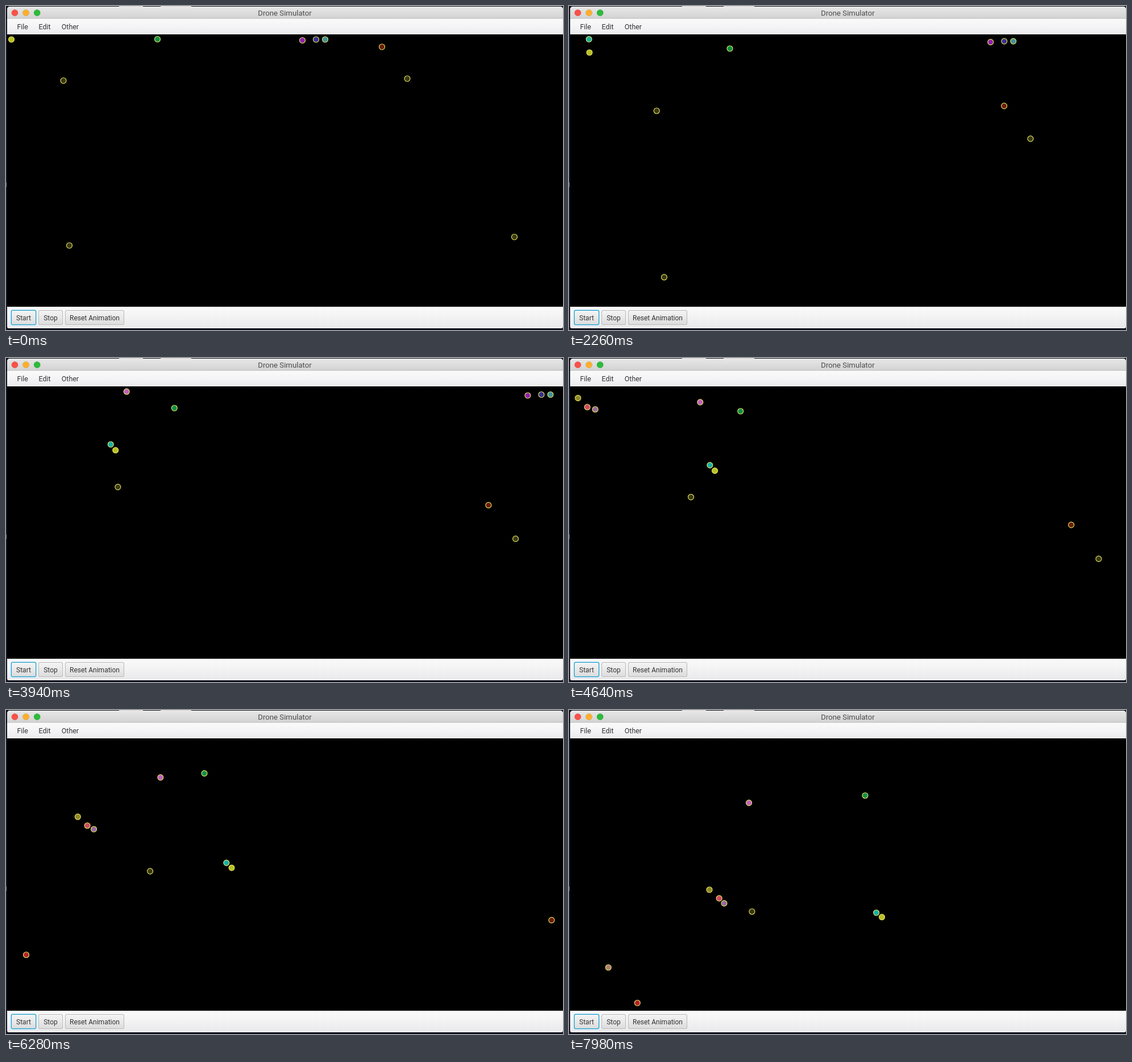
Write an HTML page with a canvas that moves like this. It is 980x571 px and loops after 8 s.

```html
<!DOCTYPE html>
<html lang="en">
<head>
<meta charset="utf-8">
<title>Drone Simulator</title>
<style>
  html, body { margin: 0; width: 100%; height: 100%; overflow: hidden; background: #000; }
  canvas { display: block; }
</style>
</head>
<body>
<canvas id="stage" width="980" height="571"></canvas>
<script>
const ctx = document.getElementById('stage').getContext('2d');
const LOOP = 8000;
const FONT = 'Roboto, Inter, sans-serif';
const DARK = '#3a3914';
const FAST = 4.895;

// Drones leave at the right or bottom and re-enter at the left or top.
const FIELD = { x: 9, y: 58, w: 974, h: 463.5 };

// A drone flies straight until a turn; each wrap takes its next colour.
const drone = (x, y, speed, heading, colors, ...turns) =>
  ({ x, y, speed, heading, colors, turns });
const turn = (tick, speed, heading) => ({ tick, speed, heading });

const DRONES = [
  drone(101, 131.5, 1.673, 45, [DARK], turn(143, 3.42, 46.5)),
  drone(706, 128, 3.328, 45, [DARK, '#b82030']),
  drone(661.5, 72, 3.272, 45, ['#6e1c0a', '#b08078']),
  drone(111.5, 422, 1.758, 45, [DARK, '#c060c0']),
  drone(266.5, 58.5, 0.52, 45, ['#109048'], turn(121, FAST, 12.8)),
  drone(521.5, 60.5, FAST, 0.8, ['#9020b0', '#908828'], turn(95, FAST, 46.8)),
  drone(545.5, 59, FAST, 0.8, ['#3a3090', '#d04868'], turn(90, FAST, 46.6)),
  drone(561.5, 59, FAST, 0.8, ['#4090a0', '#9868a0'], turn(89, FAST, 47.8)),
  drone(894.5, 407, 3.609, 45.1, [DARK, '#18b0a8'], turn(45, FAST, 33.6), turn(67, FAST, 29.9)),
  drone(9.5, 59, 0.78, 41, ['#b8c028'], turn(45, FAST, 25.7), turn(67, FAST, 29.5))
];

const ramp = (v, from, to) => Math.min(1, Math.max(0, (v - from) / (to - from)));

// The display refreshes in groups of three, held 20, 20 and 100 ms.
function stepAt(ms) {
  const t = ms + 20;
  return Math.floor(t / 140) * 3 + Math.min(2, Math.floor((t % 140) / 20)) - 1;
}

// The simulation falls behind the display in two stretches.
const tickAt = step => step - 4 * ramp(step, 0, 49) - 2 * ramp(step, 118, 149);

function position(d, tick) {
  let { x, y } = d;
  const legs = [{ tick: 0, speed: d.speed, heading: d.heading }, ...d.turns];
  legs.forEach((leg, i) => {
    const end = i + 1 < legs.length ? legs[i + 1].tick : Infinity;
    const dist = Math.max(0, Math.min(tick, end) - leg.tick) * leg.speed;
    const angle = leg.heading * Math.PI / 180;
    x += dist * Math.cos(angle);
    y += dist * Math.sin(angle);
  });
  return [x, y];
}

function rect(x, y, w, h, fill) {
  ctx.fillStyle = fill;
  ctx.fillRect(x, y, w, h);
}

function roundBox(x, y, w, h, r, fill) {
  ctx.beginPath();
  ctx.roundRect(x, y, w, h, r);
  ctx.fillStyle = fill;
  ctx.fill();
}

function disc(x, y, r, fill, stroke, width) {
  ctx.beginPath();
  ctx.arc(x, y, r, 0, Math.PI * 2);
  ctx.fillStyle = fill;
  ctx.fill();
  ctx.strokeStyle = stroke;
  ctx.lineWidth = width;
  ctx.stroke();
}

function shade(y0, y1, ...colors) {
  const g = ctx.createLinearGradient(0, y0, 0, y1);
  colors.forEach((c, i) => g.addColorStop(i / (colors.length - 1), c));
  return g;
}

function label(text, x, y, size, color, align = 'left') {
  ctx.font = `${size}px ${FONT}`;
  ctx.textAlign = align;
  ctx.textBaseline = 'alphabetic';
  ctx.fillStyle = color;
  ctx.fillText(text, x, y);
}

function button(text, x, w, focused) {
  if (focused) roundBox(x - 1, 535, w + 2, 28, 4, '#a8dcee');
  roundBox(x, 536, w, 26, 3, focused ? '#1a9fd0' : '#b9b9bb');
  roundBox(x + 1, 537, w - 2, 24, 2, shade(537, 561, '#f4f4f4', '#dddddd'));
  label(text, x + w / 2, 553.5, 12, '#333', 'center');
}

function drawWindow() {
  rect(0, 0, 980, 571, '#12121f');
  rect(0, 23, 2, 545, '#17172c');
  rect(0, 311, 1, 8, '#6070a0');
  rect(199, 0, 42, 1, '#d8d8d8');
  rect(272, 0, 54, 1, '#d8d8d8');

  roundBox(2, 1, 978, 567, [5, 5, 3, 3], '#eeeeee');
  roundBox(2, 1, 978, 21, [5, 5, 0, 0], shade(1, 22, '#e8e8e8', '#d2d2d2'));
  rect(2, 21.5, 978, 1, '#b4b4b6');
  ['#fb5148', '#fdb02e', '#2bbc3c'].forEach((c, i) =>
    disc(15.5 + i * 19.6, 12, 5.7, c, 'rgba(0,0,0,.12)', 0.8));
  label('Drone Simulator', 490.5, 16.7, 13.2, '#4c4c4c', 'center');

  rect(2, 22.5, 978, 28, shade(22, 51, '#fafafa', '#f4f4f6', '#eaeaec'));
  label('File', 19.5, 41.3, 12.4, '#333');
  label('Edit', 57.5, 41.3, 12.4, '#333');
  label('Other', 97.8, 41.3, 12.4, '#333');

  rect(2, 50, 978, 480, '#000');
  rect(2, 530, 978, 36, shade(530, 566, '#fafafa', '#f3f3f4', '#eaeaec'));
  button('Start', 9, 44, true);
  button('Stop', 57, 43);
  button('Reset Animation', 104, 104);
}

function drawDrone(d, tick) {
  const [x, y] = position(d, tick);
  const across = Math.floor((x - FIELD.x) / FIELD.w);
  const down = Math.floor((y - FIELD.y) / FIELD.h);
  const color = d.colors[Math.min(across + down, d.colors.length - 1)];
  disc(x - across * FIELD.w, y - down * FIELD.h, 5, color, '#e4e45c', 1.15);
}

function draw(ms) {
  drawWindow();
  const tick = tickAt(stepAt(ms));
  ctx.save();
  ctx.beginPath();
  ctx.rect(2, 50, 978, 480);
  ctx.clip();
  DRONES.forEach(d => drawDrone(d, tick));
  ctx.restore();
}

const start = performance.now();
function loop() {
  draw((performance.now() - start) % LOOP);
  requestAnimationFrame(loop);
}
loop();
</script>
</body>
</html>
```
